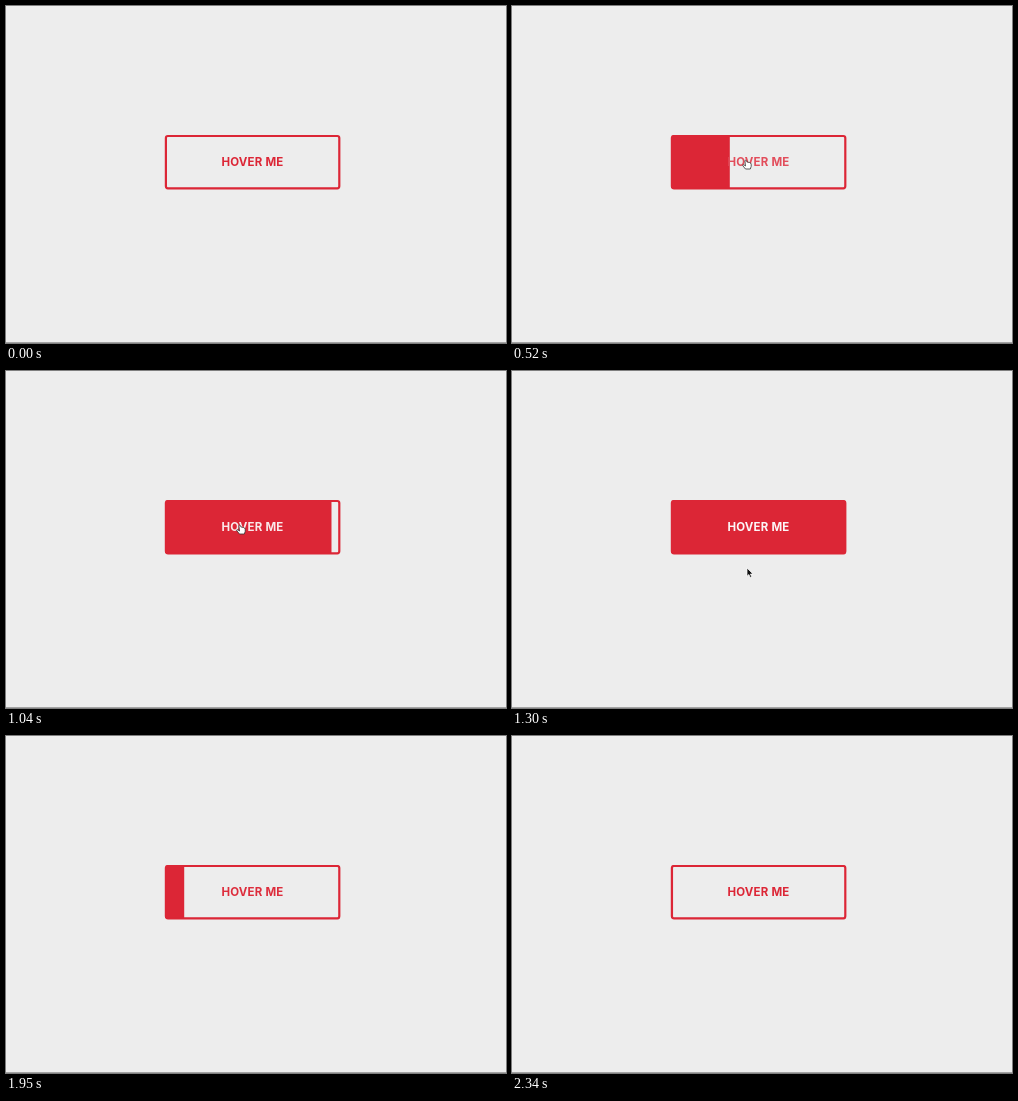
These frames come from a looping animation (500x337 px, 3510 ms). An HTML page:

```html
<!DOCTYPE html>
<html lang="en">
<head>
<meta charset="utf-8">
<title>Hover button</title>
<style>
  html, body { margin: 0; width: 100%; height: 100%; overflow: hidden; background: #ededed; }
  svg { display: block; width: 500px; height: 337px; }
  text { font: 700 11.5px Inter, sans-serif; letter-spacing: .2px; }
</style>
</head>
<body>
<svg viewBox="0 0 500 337">
  <rect width="500" height="337" fill="#ededed"/>
  <rect y="336" width="500" height="1" fill="#a3a3a3"/>
  <rect id="fill" x="160" y="130" height="52.3" fill="#dc2636"/>
  <rect x="159.9" y="130" width="173.4" height="52.3" rx="2" fill="none" stroke="#dc2636" stroke-width="2.2"/>
  <text id="label" x="246.5" y="160.2" text-anchor="middle">HOVER ME</text>
  <path id="arrow" d="M0 0V8.2L1.9 6.5L3.2 9.5L4.7 8.8L3.4 6H6Z" fill="#111" stroke="#fff" stroke-width=".7"/>
  <path id="hand" d="M-1.6 -3.4Q-.7 -4.3 0 -3.3L.6 -1.8Q1.5 -2.4 2.1 -1.5Q3.1 -1.9 3.5 -1Q4.7 -1 4.7 .2V2.4L3.8 5H-1L-3.8 1.6Q-4 .4 -2.6 .8L-1 2Z"
    fill="#fff" stroke="#333" stroke-width=".8" stroke-linejoin="round"/>
</svg>
<script>
const STEP = 130, LOOP = 27 * STEP;
const RED = [220, 38, 54], WHITE = [252, 246, 247];
const [fill, label, arrow, hand] = ['fill', 'label', 'arrow', 'hand']
  .map(id => document.getElementById(id));

// Pointer per step: [first step, shape, x, y]
const pointer = [
  [0, null], [2, arrow, 236, 238], [3, hand, 234.5, 158], [9, hand, 234.5, 164],
  [10, arrow, 235, 197], [11, arrow, 243, 259], [12, arrow, 253, 311.5], [13, null]
];

// The CSS "ease" curve: cubic-bezier(.25, .1, .25, 1)
function ease(x) {
  if (x <= 0) return 0;
  if (x >= 1) return 1;
  let lo = 0, hi = 1;
  for (let i = 0; i < 24; i++) {
    const s = (lo + hi) / 2;
    if (.75 * s * (1 - s) + s ** 3 < x) lo = s; else hi = s;
  }
  return .3 * lo * (1 - lo) ** 2 + 3 * lo * lo * (1 - lo) + lo ** 3;
}

function progress(time) {
  if (time <= 1300) return ease((time - 306) / 994);
  return 1 - ease((time - 1265) / 1100);
}

function draw(time) {
  const step = Math.floor(time / STEP);
  const p = progress(step * STEP);
  fill.setAttribute('width', p > 0 ? 1 + 172 * p : 0);
  const tint = p ** 1.5;
  label.setAttribute('fill', `rgb(${RED.map((c, i) => Math.round(c + (WHITE[i] - c) * tint))})`);

  const [, shape, x, y] = pointer.findLast(row => row[0] <= step);
  for (const el of [arrow, hand]) el.style.display = el === shape ? '' : 'none';
  if (shape) shape.setAttribute('transform', `translate(${x} ${y})`);
}

const start = performance.now();
function tick() {
  draw((performance.now() - start) % LOOP);
  requestAnimationFrame(tick);
}
tick();
</script>
</body>
</html>
```
